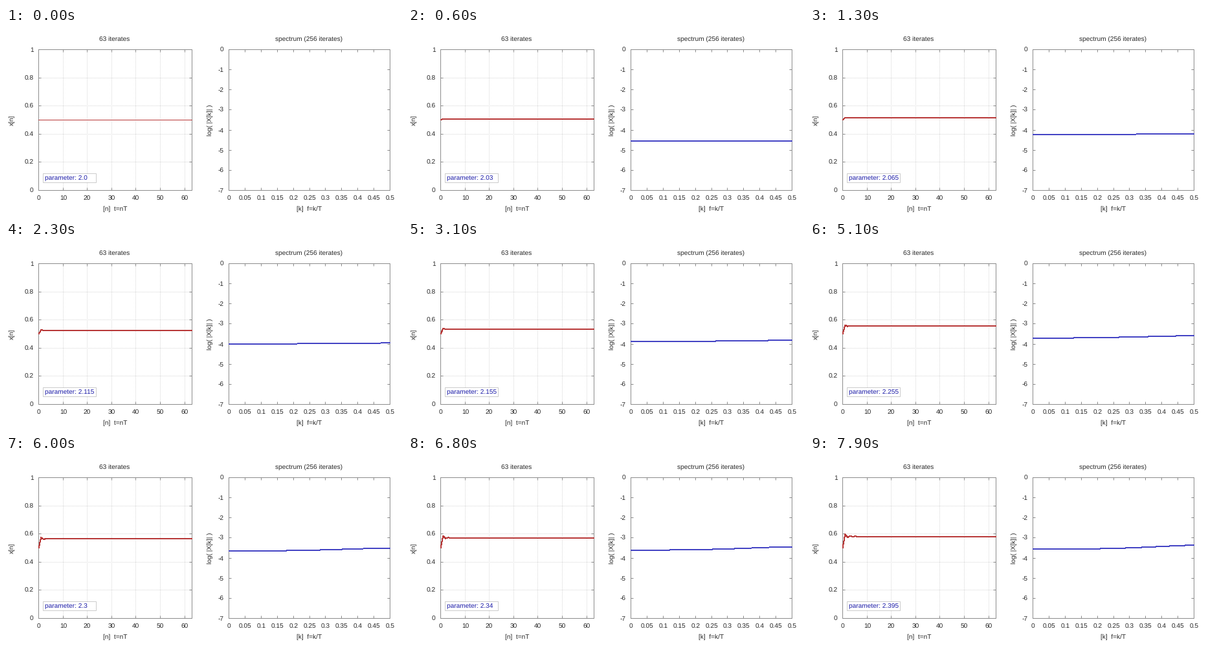
A matplotlib script for the animation above (8 s loop, 612 by 288 pixels).

```python
import numpy as np
import matplotlib.pyplot as plt
from matplotlib.animation import FuncAnimation
from matplotlib.patches import Rectangle

W, H, DPI = 612, 288, 72
FRAMES, STEP_MS = 80, 100
SHOWN, TOTAL = 63, 256
TOP, BOTTOM = 33.5, 251.5
INK, FRAME, GRID = "#282828", "#8c8c8c", "#d8d8d8"
RED, BLUE, PARAM = "#b83838", "#4444c4", "#1c1ca8"

plt.rcParams["font.family"] = "Liberation Sans"
plt.rcParams["font.size"] = 10.1
plt.rcParams["text.hinting"] = "none"
plt.rcParams["path.snap"] = False

fig = plt.figure(figsize=(W / DPI, H / DPI), dpi=DPI, facecolor="white")
ax = fig.add_axes([0, 0, 1, 1])
ax.set(xlim=(0, W), ylim=(H, 0))
ax.axis("off")


class Panel:
    """Maps data values to stage pixels and draws the plot frame."""

    def __init__(self, left, right, xlim, ylim):
        self.left, self.right = left, right
        self.xlim, self.ylim = xlim, ylim

    def px(self, x):
        a, b = self.xlim
        return self.left + (x - a) / (b - a) * (self.right - self.left)

    def py(self, y):
        a, b = self.ylim
        return BOTTOM - (y - a) / (b - a) * (BOTTOM - TOP)

    def draw(self, xticks, yticks, title, xlabel, ylabel, ylabel_x, grid=False):
        mid = (self.left + self.right) / 2
        for x in xticks:
            p = center(self.px(x))
            if grid and x > self.xlim[0]:
                dots([p, p], [TOP + 0.5, BOTTOM])
            rule([p, p], [BOTTOM, BOTTOM - 4], FRAME)
            rule([p, p], [TOP, TOP + 4], FRAME)
            label(p, 267, f"{x:g}")
        for y in yticks:
            p = center(self.py(y))
            if grid and self.ylim[0] < y < self.ylim[1]:
                dots([self.left + 0.5, self.right], [p, p])
            rule([self.left, self.left + 4], [p, p], FRAME)
            rule([self.right, self.right - 4], [p, p], FRAME)
            label(self.left - 8, p + 3.2, f"{y:g}", ha="right")
        ax.add_patch(Rectangle((self.left, TOP), self.right - self.left,
                               BOTTOM - TOP, fill=False, ec=FRAME, lw=1, zorder=2))
        label(mid - 1, 19.5, title)
        label(mid, 283, xlabel)
        label(ylabel_x, 143, ylabel, rotation=90, rotation_mode="anchor")

    def curve(self, color):
        line, = ax.plot([], [], color=color, lw=1, zorder=3,
                        solid_capstyle="butt", antialiased=False)
        return line


def center(p):
    return np.floor(p) + 0.5


def rule(xs, ys, color, **kw):
    ax.plot(xs, ys, color=color, lw=1, solid_capstyle="butt", zorder=1, **kw)


def dots(xs, ys):
    rule(xs, ys, GRID, ls=(0, (1, 1)))


def label(x, y, text, ha="center", color=INK, **kw):
    return ax.text(x, y, text, ha=ha, va="baseline", color=color, zorder=5, **kw)


def logistic(r, count):
    x = np.empty(count)
    x[0] = 0.5
    for n in range(1, count):
        x[n] = r * x[n - 1] * (1 - x[n - 1])
    return x


series = Panel(50.5, 287.5, (0, SHOWN), (0, 1))
series.draw(range(0, 61, 10), np.arange(6) / 5, "63 iterates",
            "[n]  t=nT", "x[n]", 11.5, grid=True)
spectrum = Panel(344.5, 593.5, (0, 0.5), (-7, 0))
spectrum.draw(np.arange(11) / 20, range(-7, 1), "spectrum (256 iterates)",
              "[k]  f=k/T", "log( |X[k]| )", 318)

ax.add_patch(Rectangle((57.5, 225.5), 82, 14, fc="white", ec="#cccccc",
                       lw=1, zorder=4))
param = label(60, 235.8, "", ha="left", color=PARAM)
orbit = series.curve(RED)
power = spectrum.curve(BLUE)

steps = np.arange(SHOWN + 1)
freqs = np.arange(TOTAL // 2 + 1) / TOTAL


def update(i):
    r = round(2 + 0.005 * i, 3)
    x = logistic(r, TOTAL)
    orbit.set_data(series.px(steps), series.py(x[:SHOWN + 1]))
    # Spectrum of the deviation from the fixed point
    mag = np.abs(np.fft.rfft(x - (1 - 1 / r))) / TOTAL
    if mag.max() > 1e-7:
        power.set_data(spectrum.px(freqs), spectrum.py(np.log10(mag)))
    else:
        power.set_data([], [])
    param.set_text(f"parameter: {r}")
    return orbit, power, param


anim = FuncAnimation(fig, update, frames=FRAMES, interval=STEP_MS,
                     repeat=True, repeat_delay=0, blit=False)
plt.show()
```
